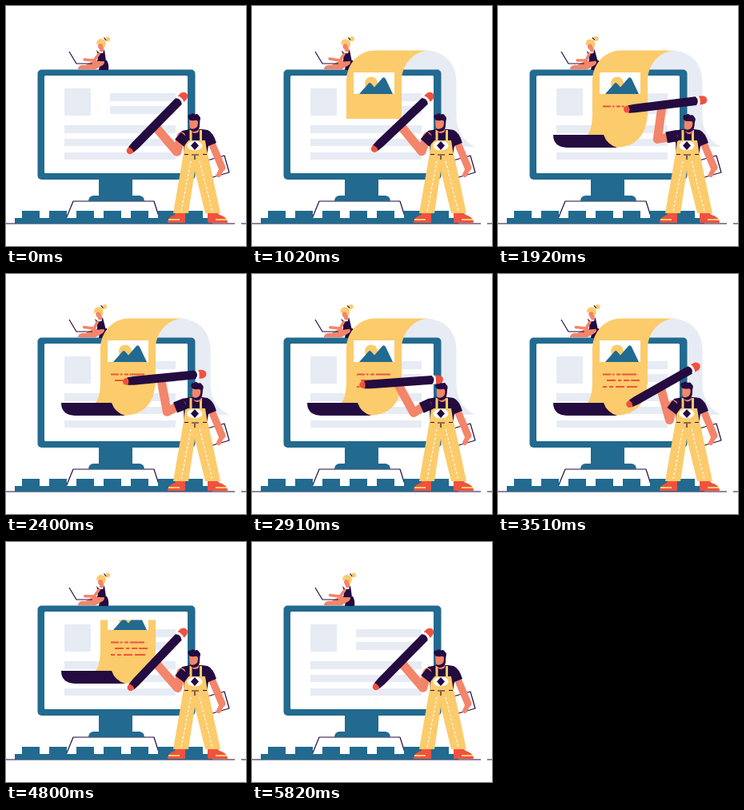
These frames come from a looping animation (300 by 300 pixels, 5.85 s). An HTML page:

```html
<!DOCTYPE html>
<html>
<head>
<meta charset="utf-8">
<style>
  html, body { margin: 0; width: 100%; height: 100%; overflow: hidden; background: #fff; }
  svg { display: block; width: 100vw; height: 100vh; }
  .teal { fill: #226a8f; }
  .dark { fill: #240b40; }
  .pale { fill: #e7ebf4; }
  .gold { fill: #fccb6b; }
  .skin { fill: #f3856a; }
  .red { fill: #f0523f; }
  .white { fill: #fff; }
  .line { fill: none; stroke: #240b40; stroke-width: 1.2; stroke-linejoin: round; }
  .boxed { fill: #fff; }
  .limb { fill: none; stroke: #f3856a; stroke-linecap: round; stroke-linejoin: round; }
  .stitch { fill: none; stroke: #fff; stroke-width: 1.2; stroke-dasharray: 3 2.5; }
</style>
</head>
<body>
<svg viewBox="0 0 300 300">
  <defs>
    <clipPath id="backClip"><rect x="180" width="105"/></clipPath>
    <clipPath id="frontClip"><rect x="100" width="125"/></clipPath>
    <clipPath id="curlClip"><rect y="155" height="26"/></clipPath>
  </defs>

  <!-- back of the paper, behind the monitor -->
  <path class="pale" clip-path="url(#backClip)" d="M187 92A36 37 0 0 1 219 55.500Q253 59 255.500 93V140Q257 165 279 176H187Z"/>

  <!-- ground -->
  <path class="line" d="M0 272H286M294 272H300"/>
  <path class="line boxed" d="M75 266L84 244H185L192 266"/>
  <g id="blocks" class="teal"><rect x="11" y="265" width="247" height="7"/></g>

  <!-- monitor -->
  <path class="teal" d="M116 215H158V237H167Q173 238 173 244H103Q103 238 109 237H116Z"/>
  <rect class="teal" x="39.500" y="79.500" width="197" height="137.500" rx="5"/>
  <rect class="white" x="48" y="87" width="179" height="122" rx="1.500"/>
  <path class="pale" d="M73 103h33v34h-33zM130 109h82v10h-82zM130 125h82v10h-82zM73 149h139v10h-139zM73 166h139v9h-139zM73 183h139v9h-139z"/>

  <!-- woman with laptop -->
  <g>
    <path class="dark" d="M118 68H126Q129 73 128 80H116Z"/>
    <path class="skin" d="M90 78Q92 73 99 74L112 67Q118 65 122 68Q125 72 119 75L112 79H90Z"/>
    <g id="woman">
      <path class="white" d="M114 57Q120 53 124 56L125 68H113Z"/>
      <path class="dark" d="M113 55L117 59H121L123 54L125 69H114Q116 63 113 55Z"/>
      <path class="skin" d="M117 50H122V57Q119 58 117 56Z"/>
      <ellipse class="skin" cx="119" cy="50" rx="4" ry="4.500"/>
      <path class="gold" d="M113 48Q113 41 119 41Q126 42 124.500 49Q123 54 121 51Q122 47 117 47Z"/>
      <circle class="gold" cx="127" cy="41.500" r="3"/>
      <path class="line" d="M122.500 39.500L125 43"/>
    </g>
    <path id="typing" class="limb" stroke-width="3.500"/>
    <path class="line" d="M79 57L88 72H108"/>
  </g>

  <!-- front of the paper -->
  <g clip-path="url(#frontClip)">
    <path class="gold" d="M118 92A36 37 0 0 1 153 55.500H222A36 37 0 0 0 187 92V136Q184 176 147 177H125L110 162Q118 158 118 132Z"/>
    <path class="white" d="M127 83h51v27h-51z"/>
    <circle class="gold" cx="149" cy="96.500" r="8"/>
    <path class="teal" d="M134 110L145.500 97Q147 95 149 97L153 101.500L163 90Q165 88 167 91L176 110Z"/>
    <g id="text" fill="none" stroke="#f0523f" stroke-width="1.800">
      <path d="M131 125.500h10M143 125.500h2.500M148 125.500h5M155 125.500h18"/>
      <path d="M136 133h11M150 133h4M157 133h7M166 133h11"/>
      <path d="M131 141h5M139 141h5M147 141h11M161 141h13"/>
    </g>
  </g>
  <path class="dark" clip-path="url(#curlClip)" d="M69 161H132Q136 173 149 177H86Q69 176 69 161Z"/>

  <!-- man -->
  <path class="red" d="M202 271Q202 264 211 261L213 258H224V271ZM277 271Q277 264 267 261L264 258H252V271Z"/>
  <path class="gold" d="M203 266H217V268H203ZM262 266H276V268H262Z"/>
  <path class="line boxed" d="M248 194L273 187L279 208L255 215Z"/>
  <path class="limb" stroke-width="9" d="M256 169L265 190L270 202"/>
  <path class="limb" stroke-width="6" d="M270 203L266 211"/>
  <path class="dark" d="M220 156Q236 152 252 155Q259 158 263 171L253 175L251 187H223L222 170L215 165Z"/>
  <path class="gold" d="M222 184H252L268 259H249L236 206L228 259H209Z"/>
  <path class="gold" d="M224 168H249L252 187H222ZM229.500 155H232.500V169H229.500ZM242 155H245V169H242Z"/>
  <path class="stitch" d="M231 194L219 257M242 194L258 257"/>
  <path class="line" d="M223 185.500H228M232 186H241M246 185.500H251M236 187V192"/>
  <ellipse class="white" cx="236" cy="174.500" rx="9.500" ry="6"/>
  <path class="dark" d="M236 169L241 174.500L236 180L231 174.500Z"/>
  <path id="bare" class="limb" stroke-width="11"/>
  <path id="sleeve" fill="none" stroke="#240b40" stroke-width="14"/>
  <g id="head">
    <path class="skin" d="M232 148H241V157Q236 161 232 157Z"/>
    <path class="skin" d="M229.500 142H242V149Q241 156 236 156Q230 156 229.500 149Z"/>
    <path class="dark" d="M242 146Q243 157 235 157Q231 157 230 153Q234 155 238 152Q240 150 240 146Z"/>
    <path class="dark" d="M228 141Q226 135 231 135.500Q233 133 236 135.500Q240 134 241 137Q244 139 242.500 143L242 149L240 146Q240 142 236 143Q230 144 228 141Z"/>
  </g>
  <g id="pencil">
    <path class="red" d="M0 0Q0 -4 5 -4.500H10V4.500H5Q0 4 0 0Z"/>
    <path class="dark" d="M6 -4.700L14 -5.400H91Q96 -5 96 0Q96 5 91 5.400H14L6 4.700Q9 0 6 -4.700Z"/>
    <path class="white" d="M91 -5.400H96V5.400H91Q96 0 91 -5.400Z"/>
    <path class="red" d="M95 -5.400H100Q105 -4 105 0Q105 4 100 5.400H95Q98 0 95 -5.400Z"/>
  </g>
</svg>
<script>
const LOOP = 5850;
const $ = id => document.getElementById(id);
const set = (el, attrs) => { for (const k in attrs) el.setAttribute(k, attrs[k]); };
const clamp = (v, lo, hi) => Math.min(hi, Math.max(lo, v));
const ease = u => (1 - Math.cos(Math.PI * clamp(u, 0, 1))) / 2;

for (let i = 0; i < 7; i++) {
  const block = document.createElementNS('http://www.w3.org/2000/svg', 'rect');
  set(block, { x: 20 + 34 * i, y: 256, width: 22, height: 10 });
  $('blocks').append(block);
}

// Eased interpolation between rows of [time, ...values]
function pose(keys, t) {
  const i = Math.max(1, keys.findIndex(k => k[0] >= t));
  const a = keys[i - 1], b = keys[i];
  const u = ease((t - a[0]) / (b[0] - a[0]));
  return a.slice(1).map((v, n) => v + (b[n + 1] - v) * u);
}

// Text lines: start x, end x, pencil y, start time
const LINES = [[131, 173, 129, 1690], [136, 177, 134, 2270], [131, 174, 139, 2840]];
const WRITE = 400;
const slant = x => -4 - (x - 134) * 0.13;

// time, tip x, tip y, pencil angle
const PENCIL = [
  [0, 152, 184, -45.5],
  [1020, 150, 181.5, -43.5],
  [1330, 150, 181.5, -43.5],
  ...LINES.flatMap(([x0, x1, y, t]) => [[t, x0, y, slant(x0)], [t + WRITE, x1, y, slant(x1)]]),
  [3720, 152, 182, -43],
  [4110, 152, 182, -43],
  [4800, 153, 185, -46.5],
  [LOOP, 152, 184, -45.5]
];
// time, head x, head y, head turn
const HEAD = [
  [0, 0, 0, 0], [1330, 0, 0, 0], [1690, 2.5, 1, 4], [2250, 3, 1, 4],
  [2840, 1, 1, 2], [3240, 1.5, 1, 2], [3720, 0, 0, 0], [LOOP, 0, 0, 0]
];
// time, woman's lean
const LEAN = [[0, 0], [500, 0], [1020, -4], [1920, -8], [2910, -6], [4110, -3], [4800, 0], [LOOP, 0]];

// The paper is drawn along its length: up the back, down the front, into the curl
function drawPaper(t) {
  const head = 325 * ease((t - 300) / 1200);
  const tail = 325 * ease((t - 4200) / 1170);
  const part = (from, len) => [clamp(tail - from, 0, len), clamp(head - from, 0, len)];
  const [b0, b1] = part(0, 125), [f0, f1] = part(125, 125), [c0, c1] = part(240, 85);
  set($('backClip').firstChild, { y: 178 - b1, height: b1 - b0 });
  set($('frontClip').firstChild, { y: 53 + f0, height: f1 - f0 });
  set($('curlClip').firstChild, { x: 152 - c1, width: c1 - c0 });
}

function drawText(t) {
  LINES.forEach(([x0, x1, , start], i) => {
    const w = (x1 - x0 + 1) * ease((t - start) / WRITE);
    $('text').children[i].style.clipPath = `polygon(0 -2px, ${w}px -2px, ${w}px 3px, 0 3px)`;
  });
}

function drawMan(t) {
  let [x, y, angle] = pose(PENCIL, t);
  if (LINES.some(l => t > l[3] && t < l[3] + WRITE)) y += 0.7 * Math.sin(t / 25);
  set($('pencil'), { transform: `translate(${x} ${y}) rotate(${angle})` });

  // Two-bone arm from the shoulder to the grip
  const r = angle * Math.PI / 180, sx = 219, sy = 163, upper = 20, fore = 41;
  const hx = x + 48 * Math.cos(r) - 2 * Math.sin(r);
  const hy = y + 48 * Math.sin(r) + 2 * Math.cos(r);
  const d = Math.hypot(hx - sx, hy - sy), ux = (hx - sx) / d, uy = (hy - sy) / d;
  const along = (upper ** 2 - fore ** 2 + d * d) / (2 * d);
  const out = Math.sqrt(Math.max(0, upper ** 2 - along ** 2));
  const ex = sx + ux * along + uy * out, ey = sy + uy * along - ux * out;
  set($('bare'), { d: `M${sx} ${sy}L${ex} ${ey}L${hx} ${hy}` });
  set($('sleeve'), { d: `M${sx + 5} ${sy - 1}L${sx + (ex - sx) * 0.42} ${sy + (ey - sy) * 0.42}` });

  const [dx, dy, turn] = pose(HEAD, t);
  set($('head'), { transform: `translate(${dx} ${dy}) rotate(${turn} 236 157)` });
}

function drawWoman(t) {
  const [lean] = pose(LEAN, t);
  const tap = Math.sin(t / LOOP * 2 * Math.PI * 16);
  set($('woman'), { transform: `rotate(${lean} 120 72)` });
  set($('typing'), { d: `M${116 + lean / 4} 60L110 68L${98 + tap} ${67 + tap}` });
}

function frame(now) {
  const t = now % LOOP;
  drawPaper(t);
  drawText(t);
  drawMan(t);
  drawWoman(t);
  requestAnimationFrame(frame);
}
frame(0);
</script>
</body>
</html>
```
